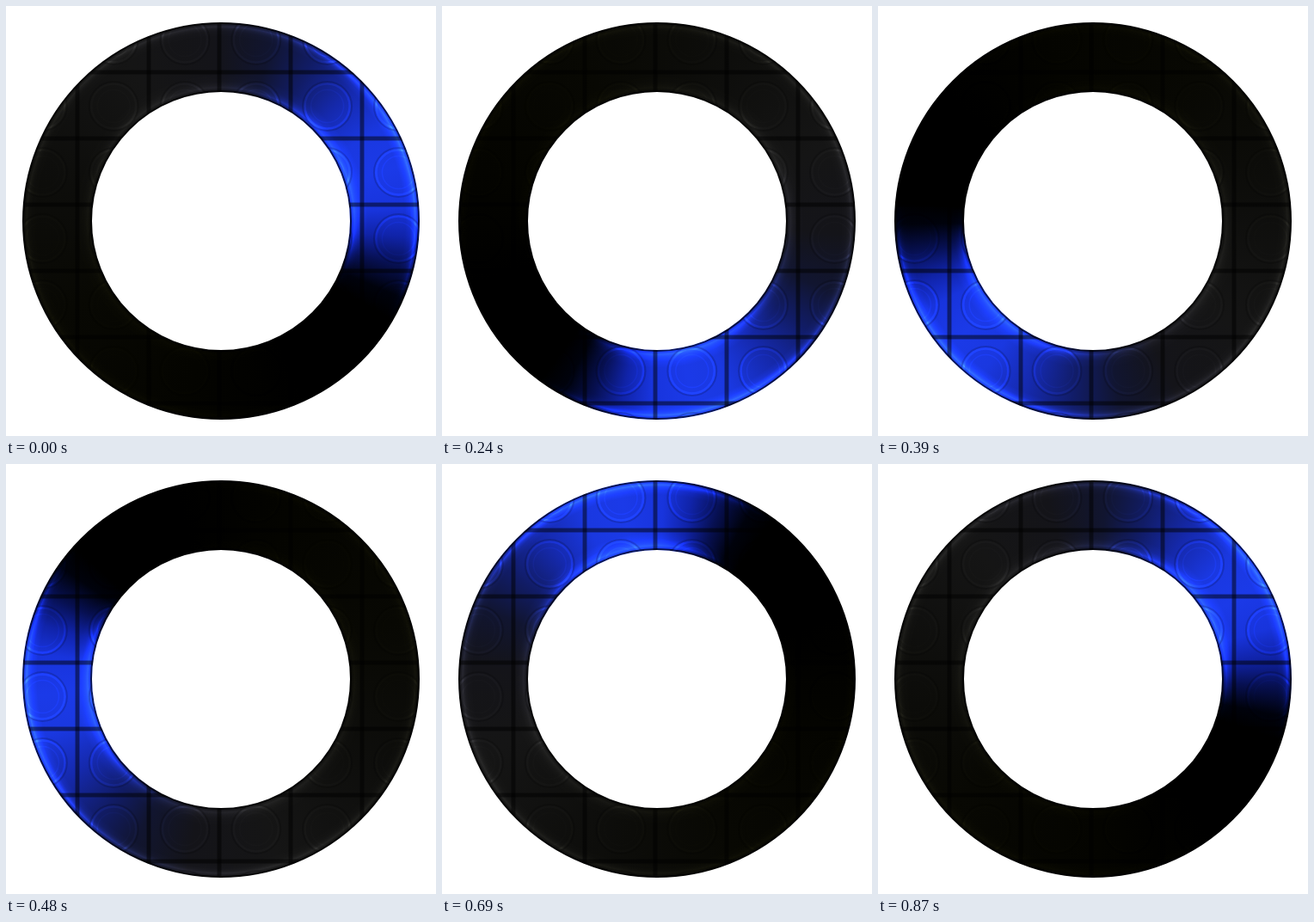
Animation, 500 px wide and 500 px high, one loop 900 ms. Source, as an HTML page with a canvas:

```html
<!DOCTYPE html>
<html lang="en">
<head>
<meta charset="utf-8">
<title>Light ring</title>
<style>
html, body { margin: 0; width: 100%; height: 100%; overflow: hidden; background: #fff; }
canvas { display: block; width: 500px; height: 500px; }
</style>
</head>
<body>
<canvas id="stage" width="500" height="500"></canvas>
<script>
const SIZE = 500, MID = 250, INNER = 150, OUTER = 231;
const LOOP = 900, STEP = 30, START = 120;
const CELL_W = 82.8, CELL_H = 77;

// Degrees behind the leading edge, colour
const TRAIL = [
  [0, '#000'], [7, '#00020c'], [16, '#071052'], [25, '#1023a8'],
  [34, '#1834dc'], [47, '#1b3ae8'], [60, '#1a38e0'], [75, '#1529ac'],
  [90, '#111c66'], [104, '#111530'], [122, '#141419'], [150, '#151515'],
  [190, '#0e0e0c'], [240, '#080803'], [290, '#040400'], [325, '#000'], [360, '#000']
];

// Radius, strength of the shine
const SHINE = [
  [150, 0], [152, 40], [155, 110], [158, 70], [163, 24], [171, 0],
  [214, 0], [220, 26], [223, 66], [226, 125], [228, 70], [230, 0], [231, 0]
];

const ctx = document.getElementById('stage').getContext('2d');

function layer(paint) {
  const canvas = document.createElement('canvas');
  canvas.width = canvas.height = SIZE;
  paint(canvas.getContext('2d'));
  return canvas;
}

function circle(c, x, y, r, width, style) {
  c.beginPath();
  c.arc(x, y, r, 0, Math.PI * 2);
  c.lineWidth = width;
  c.strokeStyle = style;
  c.stroke();
}

function eachStud(draw) {
  for (let row = 0; row < 7; row++)
    for (let col = 0; col < 6; col++)
      draw((col + 0.5) * CELL_W + 1, (row + 0.5) * CELL_H + 1);
}

const shine = layer(c => {
  c.fillStyle = '#000';
  c.fillRect(0, 0, SIZE, SIZE);
  const glow = c.createRadialGradient(MID, MID, INNER, MID, MID, OUTER);
  for (const [r, v] of SHINE)
    glow.addColorStop((r - INNER) / (OUTER - INNER), `rgb(${v},${v},${v})`);
  eachStud((x, y) => {
    circle(c, x, y, 26, 2.5, '#282828');
    circle(c, x, y, 19, 1.5, '#141414');
  });
  c.globalCompositeOperation = 'lighter';
  c.fillStyle = glow;
  c.fillRect(0, 0, SIZE, SIZE);
});

const shade = layer(c => {
  const bar = (x, y, w, h) => {
    c.fillStyle = 'rgba(0,0,0,.22)';
    c.fillRect(x, y, w, h);
    c.fillStyle = 'rgba(0,0,0,.36)';
    c.fillRect(x + (w < h ? 1 : 0), y + (w < h ? 0 : 1), w < h ? w - 2 : w, w < h ? h : h - 2);
  };
  for (let i = 1; i < 6; i++) bar(Math.round(i * CELL_W) - 3, 0, 6, SIZE);
  for (let i = 1; i < 7; i++) bar(0, i * CELL_H - 3, SIZE, 6);
  eachStud((x, y) => circle(c, x, y, 28.5, 2, 'rgba(0,0,0,.16)'));
  circle(c, MID, MID, INNER + 1, 2, 'rgba(0,0,0,.65)');
  circle(c, MID, MID, OUTER - 1, 2, 'rgba(0,0,0,.65)');
});

const mask = layer(c => circle(c, MID, MID, (INNER + OUTER) / 2, OUTER - INNER, '#000'));

function draw(time) {
  const step = Math.floor((time % LOOP) / STEP);
  const front = START + step * STEP / LOOP * 360;
  const light = ctx.createConicGradient((front - 90) * Math.PI / 180, MID, MID);
  for (const [deg, colour] of TRAIL) light.addColorStop(1 - deg / 360, colour);

  ctx.globalCompositeOperation = 'copy';
  ctx.fillStyle = light;
  ctx.fillRect(0, 0, SIZE, SIZE);
  ctx.globalCompositeOperation = 'color-dodge';
  ctx.drawImage(shine, 0, 0);
  ctx.globalCompositeOperation = 'source-over';
  ctx.drawImage(shade, 0, 0);
  ctx.globalCompositeOperation = 'destination-in';
  ctx.drawImage(mask, 0, 0);
}

const begin = performance.now();
function tick() {
  draw(performance.now() - begin);
  requestAnimationFrame(tick);
}
tick();
</script>
</body>
</html>
```
